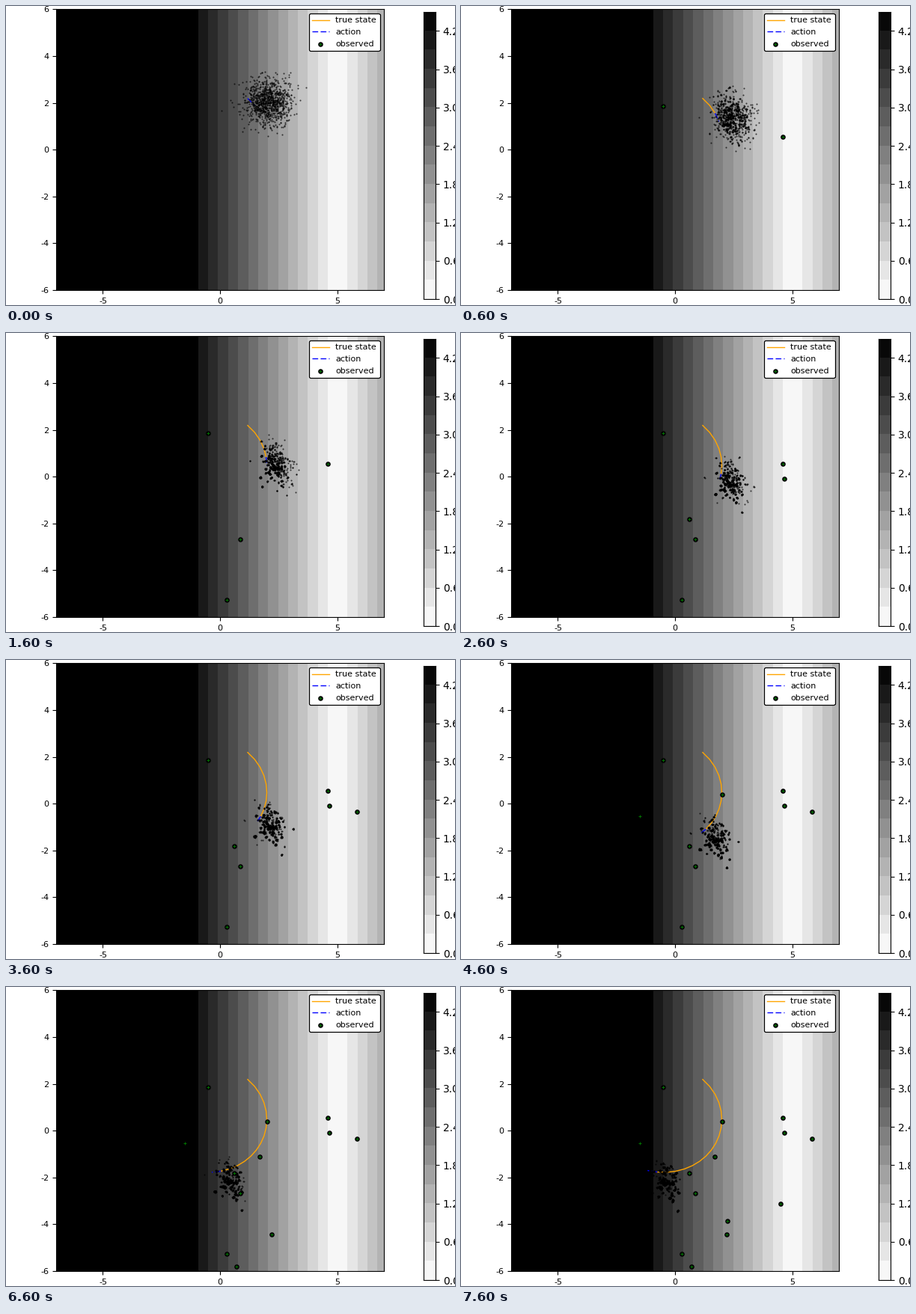
A matplotlib script that plays this animation: 600x400 px, repeating every 8000 ms.

```python
import numpy as np
import matplotlib.pyplot as plt
from matplotlib.animation import FuncAnimation

W, H, DPI = 600, 400, 100
STEPS = 16
START = (1.18, 2.19)
LIGHT_X = 5
BANDS, BAND_STEP = 15, 0.3

plt.rcParams.update({
    "font.family": "DejaVu Sans",
    "font.size": 10,
    "axes.unicode_minus": False,
})

# Observations in order of arrival; those of HIDDEN steps fall off the plot.
OBSERVED = np.array([
    (4.6, 0.55), (-0.5, 1.85), (0.87, -2.67), (0.3, -5.25), (4.65, -0.1),
    (0.62, -1.8), (5.83, -0.36), (2, 0.4), (-1.5, -0.55), (1.7, -1.1),
    (0.7, -5.8), (2.2, -4.45), (2.25, -3.87), (4.5, -3.12),
])
HIDDEN = (8, 12)
ARRIVAL = np.array([s for s in range(1, STEPS + 1) if s not in HIDDEN])


def true_path():
    """Steady clockwise turn, a little slower and tighter halfway."""
    k = np.arange(STEPS + 1)
    bend = np.sin(np.pi * k / STEPS)
    heading = -np.radians(45 + 9 * k + 6 * bend)
    length = 0.42 - 0.075 * bend
    moves = length * np.array([np.cos(heading), np.sin(heading)])
    return np.vstack([START, START + np.cumsum(moves.T, axis=0)])


def log_weight(step, off):
    """Log likelihood of particle offsets from the true state."""
    dx, dy = off.T
    u = dx + 0.25 * dy
    if step == 2:
        return -1.5 * (u - 0.5) ** 2
    if step in (3, 4):
        return -(u + 0.6) ** 2 - 0.25 * (dy + 1) ** 2
    return -0.1 * (dx - 0.33) ** 2 - 0.05 * (dy + 1.4) ** 2


def particle_clouds(path, count=1000):
    """Particle positions for every step, resampled as belief narrows."""
    rng = np.random.default_rng(4)
    off = rng.normal((0.86, -0.15), 0.49, (count, 2))
    clouds = [path[0] + off]
    for step in range(1, STEPS + 1):
        if step > 1:
            w = np.exp(log_weight(step, off))
            off = off[rng.choice(count, count, p=w / w.sum())]
        off = off + rng.normal(0, 0.008, off.shape)
        clouds.append(path[step] + off)
    return clouds


def shade(band):
    """Grey level of a band, from white to black."""
    return 1 - (band + 0.5) / BANDS


def add_axes(left, top, right, bottom):
    return fig.add_axes([left / W, 1 - bottom / H,
                         (right - left) / W, (bottom - top) / H])


def show_bands(axes, grey, extent):
    axes.imshow(grey, cmap="gray", vmin=0, vmax=1, aspect="auto", zorder=0,
                origin="lower", extent=extent, interpolation="nearest")


fig = plt.figure(figsize=(W / DPI, H / DPI), dpi=DPI, facecolor="white")

# Main plot
ax = add_axes(66.85, 4.4, 505.15, 380)
xs = np.linspace(-7, 7, 877)[:-1] + 7 / 876
bands = np.floor(np.abs(xs - LIGHT_X) / np.sqrt(2) / BAND_STEP)
grey = np.where(bands < BANDS - 1, shade(bands), 0)
show_bands(ax, grey[None, :], (-7, 7, -6, 6))
ax.set(xlim=(-7, 7), ylim=(-6, 6), xticks=(-5, 0, 5), yticks=range(-6, 7, 2))
ax.tick_params(labelsize=8)

true_line, = ax.plot([], [], color="orange", lw=1)
action_line, = ax.plot([], [], color="blue", lw=1, ls=(0, (5.5, 2.4)))
cloud_dots = ax.scatter([], [], s=2.2, color="black", alpha=0.7, lw=0, zorder=3)
discs = ax.scatter([], [], s=23, color="black", lw=0, zorder=4)
crosses = ax.scatter([], [], s=10, marker="+", color="green", lw=0.6, zorder=5)

legend = ax.legend([true_line, action_line, (discs, crosses)],
                   ["true state", "action", "observed"], loc="upper right",
                   fontsize=8, framealpha=1, edgecolor="black")
legend.get_frame().set_linewidth(0.9)
legend.set_zorder(6)

# Colour scale
bar = add_axes(558, 7.8, 574, 392)
top = BANDS * BAND_STEP
show_bands(bar, shade(np.arange(BANDS))[:, None], (0, 1, 0, top))
ticks = np.arange(0, top, 2 * BAND_STEP)
bar.set_xticks([])
bar.set_yticks(ticks, [f"{t:.1f}" for t in ticks])
bar.yaxis.tick_right()

PATH = true_path()
CLOUDS = particle_clouds(PATH)


def draw(frame):
    step = (frame + 4) // 5
    true_line.set_data(*PATH[:step + 1].T)
    action_line.set_data(*PATH[step:step + 2].T)
    cloud_dots.set_offsets(CLOUDS[step])
    for marks in (discs, crosses):
        marks.set_offsets(OBSERVED[ARRIVAL <= step])
    return true_line, action_line, cloud_dots, discs, crosses


anim = FuncAnimation(fig, draw, frames=80, interval=100, repeat=True,
                     repeat_delay=0, blit=False)
plt.show()
```
